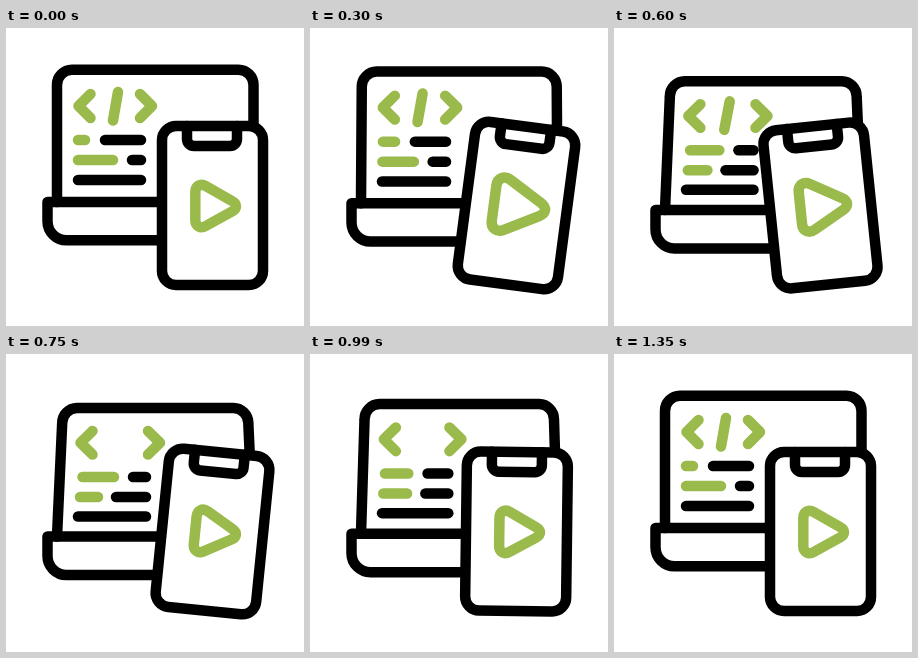
An HTML page for the animation above (1.5 s loop, 298 by 298 pixels).

```html
<!DOCTYPE html>
<html lang="en">
<head>
<meta charset="utf-8">
<title>Code and play</title>
<style>
  html, body { margin: 0; width: 100%; height: 100%; overflow: hidden; background: #fff; }
  svg { display: block; width: 100vw; height: 100vh; }
  path { fill: none; stroke: #000; stroke-width: 10.5; stroke-linecap: round; stroke-linejoin: round; }
  .accent { stroke: #9aba4b; }
  .filled { fill: #fff; }
</style>
</head>
<body>
<svg viewBox="0 0 298 298">
  <path id="screen"/>
  <path id="base"/>
  <path id="left" class="accent"/>
  <path id="slash" class="accent"/>
  <path id="right" class="accent"/>
  <path id="green1" class="accent"/>
  <path id="black1"/>
  <path id="green2" class="accent"/>
  <path id="black2"/>
  <path id="black3"/>
  <g id="phone">
    <path class="filled" d="M170 98H243A14 14 0 0 1 257 112V243A14 14 0 0 1 243 257H170A14 14 0 0 1 156 243V112A14 14 0 0 1 170 98Z"/>
    <path d="M181 98V111A7 7 0 0 0 188 118H224A7 7 0 0 0 231 111V98"/>
    <path id="play" class="accent"/>
  </g>
</svg>
<script>
const LOOP = 1500, STEP = 30;
const $ = id => document.getElementById(id);
const mix = (a, b, k) => a + (b - a) * k;
const sine = u => (1 - Math.cos(Math.PI * u)) / 2;
const quad = u => u < 0.5 ? 2 * u * u : 1 - 2 * (1 - u) * (1 - u);

// keys: [time, value] pairs
function track(keys, t, ease) {
  if (t <= keys[0][0]) return keys[0][1];
  for (let i = 1; i < keys.length; i++) {
    const [t0, a] = keys[i - 1], [t1, b] = keys[i];
    if (t < t1) return mix(a, b, ease((t - t0) / (t1 - t0)));
  }
  return keys[keys.length - 1][1];
}

const TILT = [[150, 0], [700, 1], [750, 1], [1350, 0]];
const TYPING = [[90, 0], [740, 1], [1350, 0]];
const SWING = [[60, 0], [270, 8], [540, -8], [780, 6.3], [1050, 0]];
const GROW = [[60, 1], [400, 1.33], [780, 1]];
const SLASH_OFF = 660, SLASH_ON = 1140;

const setPath = (id, d) => $(id).setAttribute('d', d);

// tilt moves everything, typing changes the lengths of the code lines
function drawLaptop(tilt, typing) {
  const m = (a, b) => mix(a, b, tilt).toFixed(2);
  const w = (a, b) => mix(a, b, typing).toFixed(2);
  const y = m(174, 182.5), top = m(41.8, 54), shoulder = m(57, 69);
  const xl = m(51, 56.2), xr = m(247.5, 242.3);
  setPath('screen', `M51 ${y}L${xl} ${shoulder}A15 15 0 0 1 ${m(66, 71)} ${top}` +
    `H${m(232.5, 227.5)}A15 15 0 0 1 ${xr} ${shoulder}L247.5 ${y}`);

  const low = m(212.3, 221);
  setPath('base', `M168 ${y}H41.5V${m(193.3, 202)}A19 19 0 0 0 60.5 ${low}H168`);

  const bracket = (id, x0, x1, dir) => setPath(id,
    `M${m(x0 + 12 * dir, x1 + 12 * dir)} ${m(66, 77)}L${m(x0, x1)} ${m(78, 88.7)}` +
    `L${m(x0 + 12 * dir, x1 + 12 * dir)} ${m(90, 100.5)}`);
  bracket('left', 72.5, 74.5, 1);
  bracket('right', 146, 154, -1);
  setPath('slash', `M${m(112, 116)} ${m(64, 74)}L${m(107, 110.5)} ${m(92.5, 102.5)}`);

  const row = (id, y0, y1, a0, a1, b0, b1) =>
    setPath(id, `M${w(a0, a1)} ${m(y0, y1)}H${w(b0, b1)}`);
  row('green1', 112, 123, 72, 76.5, 79, 108);
  row('black1', 112, 123, 99, 127, 135, 140);
  row('green2', 132, 143, 72, 74, 107, 92);
  row('black2', 132, 143, 126, 110, 135, 140);
  row('black3', 152, 162.5, 72, 72, 135, 140);
}

// Rounded triangle; its outline keeps its weight while it grows
function drawPlay(s) {
  const at = (x, y) => `${(209.5 + x * s).toFixed(2)} ${(178 + y * s).toFixed(2)} `;
  setPath('play', 'M' + at(-20.2, -14) + 'C' + at(-20.2, -20) + at(-15, -23) + at(-9.8, -20) +
    'L' + at(16.5, -5) + 'C' + at(21.8, -2) + at(21.8, 2.5) + at(16.5, 5.5) +
    'L' + at(-9.8, 20) + 'C' + at(-15, 23) + at(-20.2, 20) + at(-20.2, 14) + 'Z');
}

function draw(t) {
  drawLaptop(track(TILT, t, quad), track(TYPING, t, quad));
  drawPlay(track(GROW, t, sine));
  $('phone').setAttribute('transform', `rotate(${track(SWING, t, sine).toFixed(3)} 206.3 177.5)`);
  $('slash').setAttribute('visibility', t >= SLASH_OFF && t < SLASH_ON ? 'hidden' : 'visible');
}

const start = performance.now();
function tick() {
  const t = (performance.now() - start) % LOOP;
  draw(Math.floor(t / STEP) * STEP);
  requestAnimationFrame(tick);
}
draw(0);
requestAnimationFrame(tick);
</script>
</body>
</html>
```
